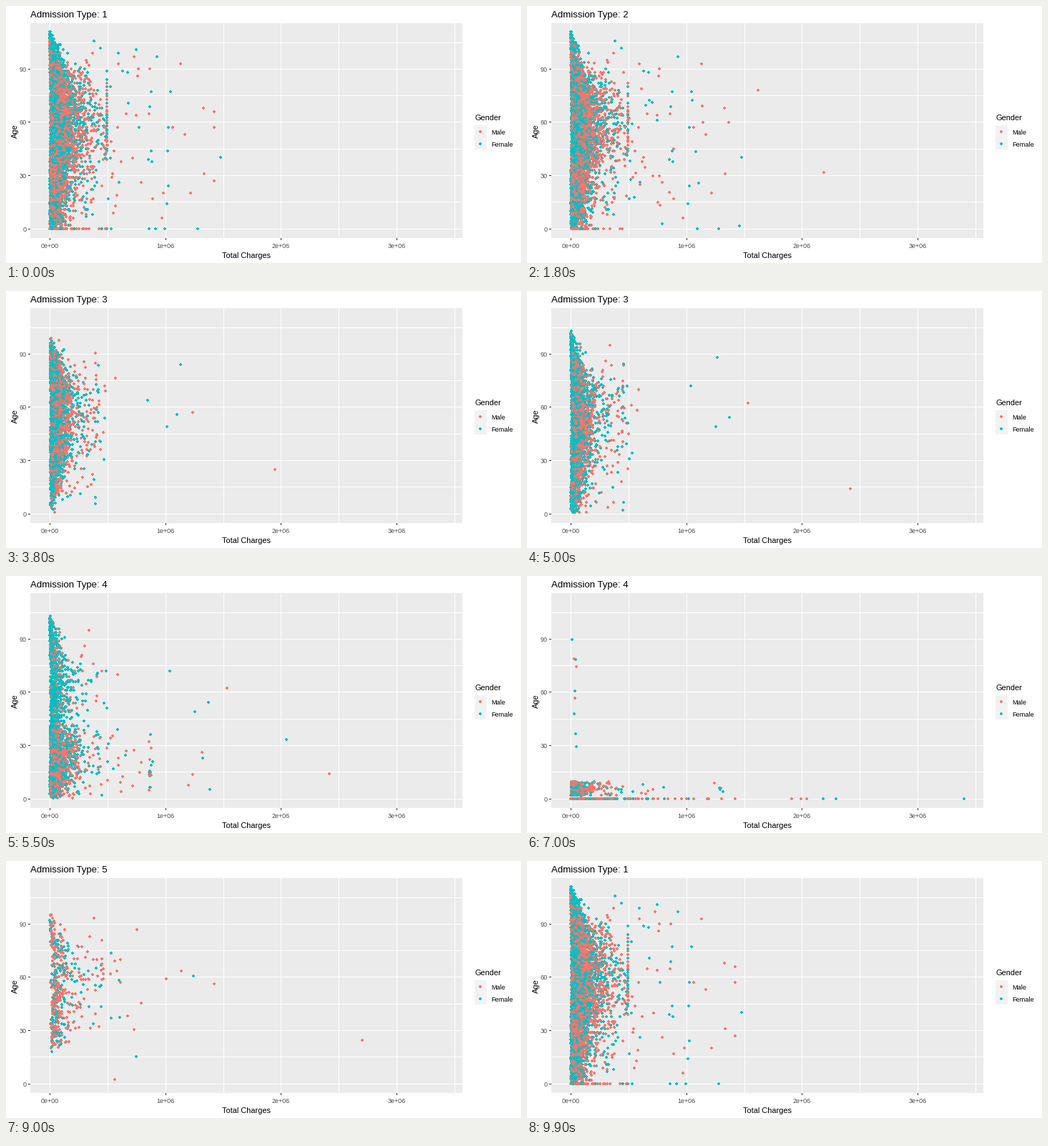
Recreate the animation shown at these times as a matplotlib script. Size 720 by 360 pixels, loop 10000 ms.

```python
import numpy as np
import matplotlib.pyplot as plt
from matplotlib.animation import FuncAnimation
from matplotlib.patches import Rectangle

W, H = 720, 360
X0, Y0 = 61, 312                       # pixel origin of the data
MILLION, YEAR = 161.7, 2.484           # pixels per unit of each axis
RED, TEAL = "#F8766D", "#00BFC4"
HOLD_END = [10, 30, 49, 69, 89]        # last still frame of each state
STEPS = 10
LEFT = X0 + 1

# The few points that stand far out, per state, male then female.
FAR = [
    [[(276, 143), (277, 235), (250, 180), (233, 170), (218, 297)],
     [(300, 212), (268, 312), (230, 120), (203, 120)]],
    [[(500, 235), (388, 126), (336, 156)], [(355, 310), (280, 312)]],
    [[(452, 277), (309, 157)], [(283, 177), (264, 190), (229, 133)]],
    [[(391, Y0), (383, Y0), (370, Y0)], [(611, Y0), (432, Y0), (414, Y0)]],
    [[(545, 254), (316, 182), (242, 162), (160, 305)],
     [(168, 152), (195, 270)]],
]

plt.rcParams["font.family"] = "Liberation Sans"
rng = np.random.default_rng(12)


def add_tail(x, share, start, scale):
    far = rng.random(len(x)) < share
    x[far] = start + rng.exponential(scale, far.sum())
    return np.minimum(x, 230)


def cloud(n, ages, shape, med, tail, babies=0.0):
    """Skewed charges against age, widest in the early sixties."""
    lo, hi = ages
    age = np.round(lo + (hi - lo) * rng.beta(*shape, n))
    age[rng.random(n) < babies] = 0
    wide = med * (0.55 + 0.8 * np.exp(-((age - 62) / 25) ** 2))
    wide *= np.clip((hi + 3 - age) / 30, 0, 1)
    x = np.minimum(wide * rng.lognormal(0, 0.9, n), 80)
    x = np.where(age < hi - 12, add_tail(x, *tail), x)
    return np.column_stack([X0 + x, Y0 - YEAR * age])


def newborns(n, strays):
    x = add_tail(5 * rng.lognormal(0, 1.25, n), 0.02, 25, 110)
    age = np.zeros(n)
    x[-strays:] = rng.uniform(1, 8, strays)
    age[-strays:] = rng.uniform(18, 90, strays)
    return np.column_stack([X0 + x, Y0 - YEAR * age])


def put(pts, far, at):
    """Place far points so that they end at, or start from, a row."""
    at = len(pts) - len(far) if at < 0 else at
    pts[at:at + len(far)] = far
    return pts


def build(g):
    """The five states of one gender; equal rows belong together."""
    n1, n2 = (4300, 4500)[g], (1650, 2000)[g]
    n4, n5 = (1350, 900)[g], (330, 190)[g]
    med, top = (9.5, 7.5)[g], (107, 112)[g]
    pts = [
        cloud(n1, (0, top), (1.5, 1.6), med, (0.014, 45, 45), 0.06),
        cloud(n2, (0, 100), (1.5, 1.4), med, (0.012, 70, 60), 0.04),
        cloud(n2, (0, 104), (1.7, 1.6), med - 1, (0.012, 40, 40)),
        newborns(n4, (3, 6)[g]),
        cloud(n5, (20, 99), (1.1, 1.4), 11, (0.07, 50, 40)),
    ]
    rows = [-1, 0, -1, n5, 0]
    return [put(p, far[g], at) for p, far, at in zip(pts, FAR, rows)]


states = [build(0), build(1)]
depth = [rng.random(len(s[0])) for s in states]
inks = np.array([[0xF8, 0x76, 0x6D], [0x00, 0xBF, 0xC4]]) / 255

fig = plt.figure(figsize=(W / 72, H / 72), dpi=72, facecolor="white")
ax = fig.add_axes([0, 0, 1, 1])
ax.set_xlim(0, W)
ax.set_ylim(H, 0)
ax.axis("off")

# A four pixel dot with its corners cut off.
DOT = [(-2, -1), (-1, -1), (-1, -2), (1, -2), (1, -1), (2, -1),
       (2, 1), (1, 1), (1, 2), (-1, 2), (-1, 1), (-2, 1), (-2, -1)]


def scatter(x, y, **kw):
    return ax.scatter(x, y, s=16, marker=DOT, lw=0, zorder=3, **kw)


def box(x, y, w, h, color):
    ax.add_patch(Rectangle((x, y), w, h, fc=color, lw=0, zorder=1,
                           antialiased=False))


def label(x, y, text, size, color="black", **kw):
    return ax.text(x, y, text, fontsize=size, color=color, va="baseline", **kw)


box(34, 24, 604, 301, "#EBEBEB")
for i in range(8):
    x, y = round(X0 + MILLION / 2 * i), int(Y0 - 15 * YEAR * i)
    box(x, 24, 1, 301, "white")
    box(34, y, 604, 1, "white")
    if i % 2 == 0:
        box(x, 325, 1, 3, "#333333") if i < 7 else None
        box(31, y, 3, 1, "#333333")
        label(x, 339, f"{i // 2}e+0{6 if i else 0}", 9, "#4D4D4D", ha="center")
        label(29, y + 4, str(15 * i), 9, "#4D4D4D", ha="right")

label(336, 353, "Total Charges", 11, ha="center")
label(16, 175, "Age", 11, ha="center", rotation=90, rotation_mode="anchor")
title = label(34, 16, "", 13.2)

label(655, 160, "Gender", 11)
for y, name, color in [(167, "Male", RED), (184, "Female", TEAL)]:
    box(655, y, 17, 17, "#F2F2F2")
    scatter([663], [y + 9], c=color)
    label(678, y + 13, name, 9.1)

dots = scatter([], [])


def pose(frame):
    """Current state, next state and step between them."""
    for i, end in enumerate(HOLD_END):
        if frame <= end:
            return i, i, 0
        if frame < end + STEPS:
            return i, (i + 1) % 5, frame - end
    return 0, 0, 0


def draw(frame):
    a, b, step = pose(frame)
    parts = []
    for s in states:
        pts = s[a].copy()
        n = min(len(pts), len(s[b]))
        pts[:n] += step / STEPS * (s[b][:n] - pts[:n])
        parts.append(pts)
    counts = [len(p) for p in parts]
    order = np.argsort(np.concatenate([d[:n] for d, n in zip(depth, counts)]))
    dots.set_offsets(np.round(np.vstack(parts))[order])
    dots.set_facecolor(np.repeat(inks, counts, axis=0)[order])
    title.set_text(f"Admission Type: {(b if step >= 5 else a) + 1}")
    return dots, title


anim = FuncAnimation(fig, draw, frames=100, interval=100, repeat=True,
                     repeat_delay=0, cache_frame_data=False)
plt.show()
```
